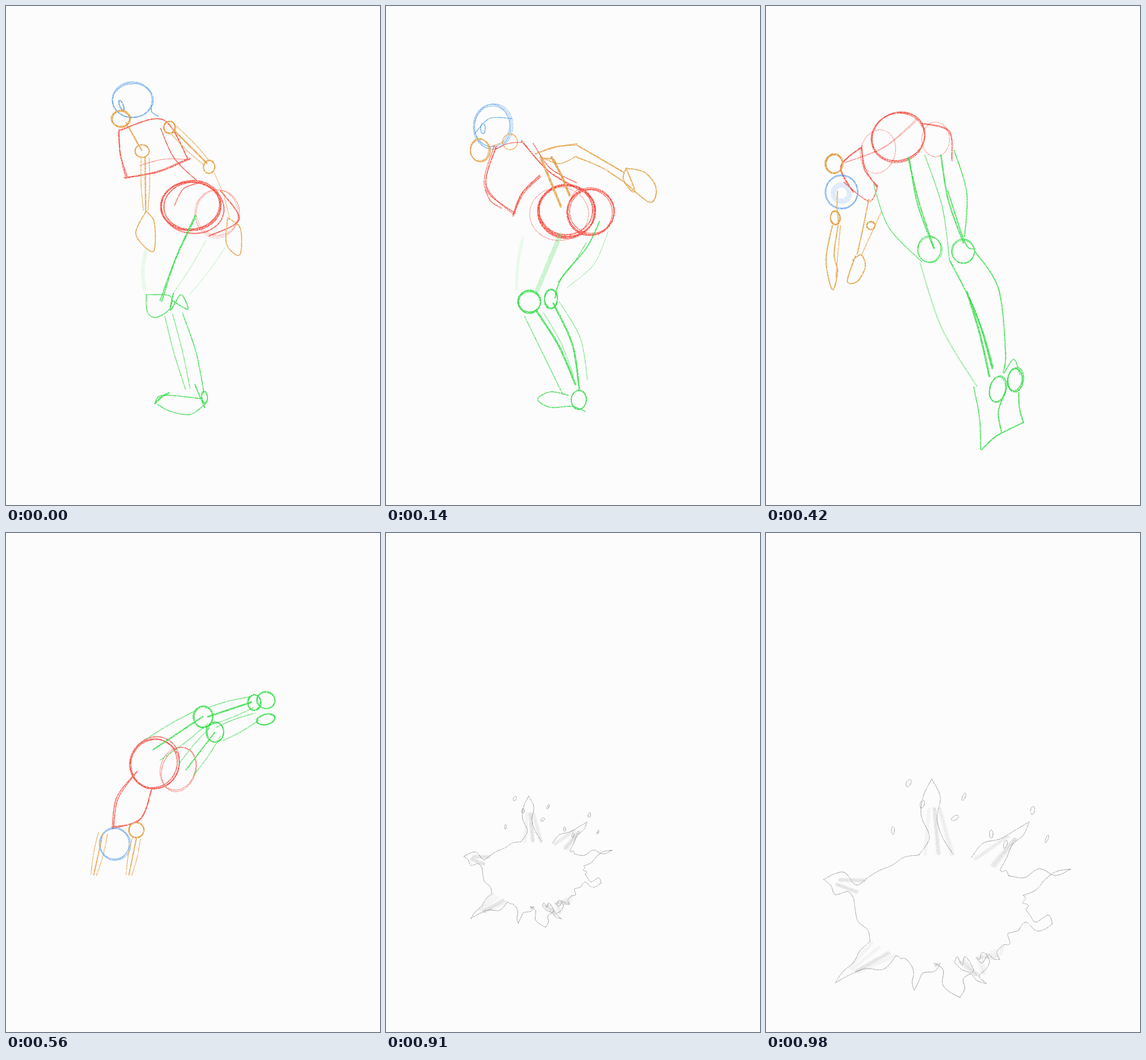
An HTML page for the animation above (1.05 s loop, 648 by 864 pixels).

```html
<!DOCTYPE html>
<html lang="en">
<head>
<meta charset="utf-8">
<title>Dive study</title>
<style>
  html, body { margin: 0; width: 100%; height: 100%; overflow: hidden; background: #fcfcfc; }
  svg { display: block; width: 100vw; height: 100vh; }
  path, ellipse { fill: none; stroke-linecap: round; stroke-linejoin: round; vector-effect: non-scaling-stroke; }
</style>
</head>
<body>
<svg id="stage" viewBox="0 0 648 864">
  <filter id="grain" filterUnits="userSpaceOnUse" x="0" y="0" width="648" height="864" color-interpolation-filters="sRGB">
    <feTurbulence type="fractalNoise" baseFrequency=".6" numOctaves="2" seed="4"/>
    <feColorMatrix values="0 0 0 0 0  0 0 0 0 0  0 0 0 0 0  3 0 0 0 -.6" result="tooth"/>
    <feComposite in="SourceGraphic" in2="tooth" operator="in"/>
  </filter>
</svg>
<script>
const stage = document.getElementById('stage');
const LOOP = 1050;
let layer, seed = 7;

const random = () => (seed = seed * 16807 % 2147483647) / 2147483647;
const jitter = amount => (random() * 2 - 1) * amount;

function add(parent, tag, attrs) {
  const node = document.createElementNS('http://www.w3.org/2000/svg', tag);
  for (const key in attrs) node.setAttribute(key, attrs[key]);
  return parent.appendChild(node);
}

// Smooth curve through a list of points.
function curve(p) {
  const at = i => p[Math.max(0, Math.min(p.length - 1, i))];
  const handle = (a, b, c, k) => [0, 1].map(j => b[j] + (c[j] - a[j]) * k / 6);
  return 'M' + p[0] + p.slice(1).map((to, i) =>
    `C${handle(at(i - 1), at(i), to, 1)} ${handle(at(i), to, at(i + 2), -1)} ${to}`).join('');
}

// The point beside a straight segment: t along it, side to its left.
function beside(x1, y1, x2, y2, t, side) {
  const dx = x2 - x1, dy = y2 - y1, length = Math.hypot(dx, dy) || 1;
  return [x1 + dx * t + dy / length * side, y1 + dy * t - dx / length * side];
}

function pen(stroke, weight = 1.3) {
  const ink = (width, opacity) => ({ stroke, 'stroke-width': width * weight, 'stroke-opacity': opacity });
  const trace = (points, width = 1.3, opacity = .85, passes = 1) => {
    for (let i = 0; i < passes; i++) {
      const loose = i ? 3 : 0;
      add(layer, 'path', { d: curve(points.map(([x, y]) => [x + jitter(loose), y + jitter(loose)])), ...ink(width, opacity) });
    }
  };
  const line = (text, ...style) => trace(text.split(' ').map(pair => pair.split(',').map(Number)), ...style);
  const bow = (x1, y1, x2, y2, bend, ...style) =>
    trace([[x1, y1], beside(x1, y1, x2, y2, .5, bend), [x2, y2]], ...style);
  // Two outlines around a straight bone, with an optional core stroke.
  const limb = (x1, y1, x2, y2, start, end, core = 0, width = 1.1) => {
    const bone = [x1, y1, x2, y2];
    for (const side of [-1, 1])
      bow(...beside(...bone, 0, side * start), ...beside(...bone, 1, side * end), side * 2, width, .7);
    if (core) bow(...bone, 0, core);
  };
  const ring = (cx, cy, rx, ry, count = 1, width = 1.3, tilt = 0, opacity = .8) => {
    for (let i = 0; i < count; i++) {
      const loose = i ? .07 : 0, x = cx + jitter(rx * loose), y = cy + jitter(ry * loose);
      add(layer, 'ellipse', {
        cx: x, cy: y, rx: rx * (1 + jitter(loose)), ry: ry * (1 + jitter(loose)),
        transform: `rotate(${tilt + jitter(loose * 150)} ${x} ${y})`, ...ink(width, opacity)
      });
    }
  };
  const ragged = (x1, y1, x2, y2, steps, rough, ...style) =>
    trace(Array.from({ length: steps + 1 }, (_, i) =>
      beside(x1, y1, x2, y2, i / steps, i % steps ? jitter(rough) : 0)), ...style);
  return { line, bow, limb, ring, ragged };
}

const blue = pen('#4793e6'), red = pen('#f53d30'), orange = pen('#e0932b');
const green = pen('#25d93b'), grey = pen('#555', 1);

function crouch() {
  blue.ring(219, 163, 34, 30, 3, 1.1, 0, .6);
  blue.bow(252, 170, 264, 191, -6);
  blue.ring(200, 172, 3, 9, 2, 1.2, -20);
  red.bow(196, 215, 208, 298, -4, 1.4, .8, 2);
  red.bow(207, 298, 318, 264, -6, 1.2, .7, 3);
  red.bow(196, 215, 314, 262, 45, 1.4, .7, 2);
  red.bow(268, 212, 330, 302, -10, 1.3);
  red.bow(232, 276, 318, 266, 6, 1, .6);
  red.ring(320, 347, 52, 42, 4, 1.6);
  red.ring(365, 360, 37, 42, 3, .8, 0, .4);
  red.bow(372, 320, 352, 398, 43, 1.7);
  red.bow(292, 345, 340, 305, 12);
  orange.ring(199, 196, 15, 14, 3, 1.4);
  orange.bow(208, 202, 235, 250, 0, 1.8);
  orange.ring(236, 251, 12, 11, 2);
  orange.limb(241, 263, 242, 354, 7, 4, 1.8);
  orange.line('243,355 225,395 255,425 257,375 243,355', 1.4);
  orange.ring(283, 210, 10, 10, 3, 1.5);
  orange.limb(290, 214, 348, 272, 8, 6, 2);
  orange.ring(352, 279, 10, 11, 2);
  orange.bow(361, 289, 388, 370, 3, 1, .6);
  orange.line('384,367 406,385 405,431 382,412 384,367', 1.4);
  green.bow(328, 362, 267, 510, -3, 1.6, .8, 2);
  green.bow(347, 405, 288, 500, 2, .8, .4);
  green.bow(380, 418, 318, 500, 2, .8, .3);
  green.bow(242, 425, 240, 490, -4, 5, .1);
  green.line('243,500 245,530 260,539 283,525 284,502 243,500');
  green.line('290,498 285,527 303,500 315,525 288,510', 1.7);
  green.limb(282, 536, 315, 663, 7, 4);
  green.bow(306, 532, 343, 670, 5);
  green.line('258,688 272,674 340,680');
  green.line('263,690 285,702 320,707 346,688');
  green.bow(258, 688, 282, 670, 2, 2.4);
  green.bow(327, 655, 344, 695, 0, 1.7);
  green.ring(344, 677, 5, 10, 2);
}

function windUp() {
  blue.ring(185, 207, 32, 37, 4, .9, 0, .6);
  blue.bow(153, 222, 218, 195, 15, 1);
  blue.ring(168, 212, 4, 9);
  orange.ring(163, 250, 17, 19, 3, 1.1);
  orange.ring(215, 235, 13, 14, 2, 1, 0, .6);
  orange.bow(178, 245, 205, 235, 0, 1);
  red.bow(190, 244, 222, 362, -33, 1.2, .7, 3);
  red.bow(172, 318, 200, 350, -6);
  red.bow(220, 362, 265, 294, 8, 1.2, .7, 4);
  red.bow(190, 248, 235, 236, 4, 1);
  red.bow(235, 233, 340, 320, -11, 1.4, .75, 2);
  red.bow(255, 238, 330, 306, -12, 1.2);
  red.ring(314, 355, 49, 44, 4, 1.7);
  red.ring(300, 360, 51, 46, 1, .9, 0, .5);
  red.ring(355, 357, 40, 40, 4, 1.2);
  red.ring(338, 355, 22, 38, 1, 1, 0, .5);
  orange.bow(268, 262, 303, 347, 0, 3);
  orange.bow(287, 262, 318, 328, 2, 3);
  orange.bow(274, 264, 297, 280, 8, 2);
  orange.bow(258, 256, 330, 241, 5, 1.2, .8, 2);
  orange.bow(270, 262, 330, 260, -12);
  orange.bow(331, 241, 412, 288, 0, 1.8);
  orange.bow(331, 262, 410, 303, 4, 1.5);
  orange.line('416,281 411,300 426,321 430,316 416,281', 1.5);
  orange.line('416,281 448,288 468,315 457,340 412,304', 1.6);
  green.bow(302, 396, 262, 492, 0, 6, .28);
  green.bow(237, 402, 226, 490, -3, 4, .1);
  green.line('370,373 348,418 304,471 293,505', 1.7);
  green.bow(347, 410, 298, 478, 3, 1);
  green.bow(385, 390, 313, 488, 14, .8, .5);
  green.ring(248, 512, 20, 19, 4);
  green.ring(286, 507, 11, 17, 3);
  green.bow(240, 537, 306, 672, 0, 1);
  green.bow(260, 527, 328, 655, 6, 2.7);
  green.bow(272, 530, 325, 640, 5, 1, .6);
  green.bow(290, 515, 335, 664, 11, 2.4);
  green.bow(300, 512, 349, 647, 13, .9, .7);
  green.line('316,674 285,668 263,681 285,695 322,693 345,702');
  green.ring(334, 682, 13, 16, 2);
}

function bend() {
  blue.ring(187, 252, 33, 33, 3, 1, 0, .6);
  blue.bow(164, 252, 166, 278, 3);
  orange.ring(151, 317, 22, 19, 3, 1.2);
  orange.limb(153, 335, 155, 412, 16, 14);
  orange.bow(150, 335, 155, 410, 0, 6, .13);
  orange.bow(154, 375, 157, 425, 0, 1.6);
  orange.ring(157, 424, 13, 13, 3);
  orange.limb(150, 436, 136, 528, 5, 5, 0, 1.5);
  orange.bow(174, 420, 151, 525, 0, .9, .6);
  orange.line('131,530 118,570 115,598 128,601 141,598 150,558', 1.5);
  orange.line('160,535 165,575 156,580 152,562', 1.5);
  orange.ring(151, 542, 10, 12, 1, 1.5);
  orange.bow(120, 568, 148, 576, 0, .9);
  orange.bow(114, 598, 140, 598, -4, 2);
  red.line('247,281 195,273 158,300 168,340 200,385 242,398', 1.4, .8, 2);
  red.bow(182, 360, 238, 399, -16, 1.1);
  red.bow(254, 289, 297, 315, -4, 1.7, .8, 2);
  red.bow(235, 394, 298, 315, 14, 1.4, .75, 5);
  red.ring(322, 367, 58, 50, 3, 1.3, 10);
  red.ring(337, 369, 44, 43, 1, 1, 0, .6);
  red.bow(275, 318, 372, 340, 10, 1.6);
  red.bow(358, 326, 402, 412, 37, 1.3, .75, 2);
  red.bow(405, 408, 362, 408, 5, 1.3, .75, 2);
  orange.ring(248, 284, 9, 7, 3);
  green.line('323,410 268,480 247,510 247,528', 1.8);
  green.bow(318, 415, 262, 503, 3, 1, .6, 2);
  green.bow(249, 408, 222, 530, -17, 1);
  green.bow(395, 417, 308, 510, 4, 2.9);
  green.bow(358, 418, 295, 505, 7, 1);
  green.bow(413, 400, 330, 490, 14, .9, .6);
  green.ring(245, 524, 23, 17, 4, 1.6);
  green.ring(292, 520, 17, 14, 3, 1.5);
  green.line('225,540 245,575 320,620 352,652', 1.1);
  green.bow(255, 540, 372, 642, 7, 1.7);
  green.bow(300, 535, 388, 632, 3, 1.7);
  green.bow(312, 525, 398, 632, 7, 1.2);
  green.line('352,652 317,690 338,709 385,685', 1);
  green.bow(330, 672, 410, 655, 14, 1.3, .8, 2);
  green.bow(328, 670, 350, 655, 0, 2.3);
  green.ring(379, 669, 14, 15, 2, 1);
  green.ring(402, 655, 10, 13, 3, 1.5);
}

function leap() {
  red.ring(229, 226, 47, 41, 3, 1.2, -20);
  red.ring(194, 252, 30, 38, 1, .9, 15, .5);
  red.bow(135, 272, 262, 195, -12, .9, .5, 2);
  red.bow(270, 203, 322, 265, 28, 1.2, .75, 2);
  red.ring(294, 231, 24, 30, 1, .9, 0, .5);
  red.bow(165, 245, 150, 320, -28, 1.4, .8, 2);
  red.bow(165, 245, 193, 315, -7, 1.4, .8, 2);
  red.line('193,315 178,338 135,305');
  blue.ring(131, 322, 27, 29, 3, 1, 0, .6);
  blue.ring(131, 324, 14, 14, 2, 7, 0, .1);
  orange.ring(118, 273, 15, 16, 4, 1.5);
  orange.bow(124, 320, 126, 378, -2);
  orange.ring(120, 367, 8, 12, 3);
  orange.line('115,380 104,440 115,491 124,460 118,430 125,380', 1.6);
  orange.bow(129, 380, 121, 470, 0, 1);
  orange.line('178,335 168,385 158,430', 1.5);
  orange.bow(200, 356, 166, 430, 0, 1);
  orange.line('155,433 141,476 158,477 172,452 165,431 150,440', 1.6);
  orange.ring(182, 380, 7, 7, 2, 1.6);
  green.bow(185, 303, 270, 443, -18, 1);
  green.bow(275, 258, 318, 440, 9, 1);
  green.bow(248, 262, 290, 418, -7, 1.8, .8, 2);
  green.bow(303, 258, 342, 410, -7, 2);
  green.line('315,320 345,410 362,420', 1.5);
  green.bow(326, 250, 344, 400, 13, 1.4);
  green.ring(283, 421, 20, 23, 3, 1, 0, .7);
  green.ring(342, 425, 19, 21, 3, 1.1, 0, .7);
  green.bow(267, 445, 365, 658, -13, 1.8, .4);
  green.bow(318, 440, 392, 628, 9, 1.7);
  green.bow(348, 495, 387, 641, 3, 2.6);
  green.bow(352, 505, 393, 625, 3, 2.2);
  green.line('362,425 403,490 415,600 411,635', 1.5);
  green.ring(402, 663, 14, 23, 2, 1.5, 15);
  green.ring(432, 648, 13, 20, 3, 1.5);
  green.bow(413, 635, 440, 638, 25);
  green.bow(360, 660, 372, 768, 4, 1.4);
  green.bow(415, 668, 408, 738, -9, 1.7);
  green.bow(438, 670, 446, 721, -3, 1.7);
  green.line('446,721 400,744 374,768', 1.7);
}

function plunge() {
  red.ring(258, 398, 42, 46, 3, 1.3, 25);
  red.ring(298, 408, 30, 38, 2, 1, 20, .6);
  red.bow(225, 415, 184, 512, -14, 1.4, .8, 2);
  red.bow(252, 445, 184, 512, 22, 1.4, .8, 2);
  blue.ring(188, 538, 26, 28, 3, 1, 0, .6);
  orange.ring(226, 514, 13, 13, 3);
  orange.limb(168, 520, 152, 592, 8, 5, 1.5);
  orange.limb(226, 528, 213, 592, 7, 5, 1.5);
  green.limb(255, 375, 341, 318, 22, 15, 2);
  green.limb(312, 410, 362, 345, 16, 12, 1.6);
  green.ring(341, 318, 17, 18, 3);
  green.ring(362, 345, 15, 17, 3);
  green.limb(350, 318, 425, 293, 15, 10, 2.4);
  green.limb(370, 348, 435, 318, 13, 7);
  green.ring(430, 293, 11, 13, 3);
  green.ring(450, 290, 16, 14, 2, 1.4, 10);
  green.ring(450, 323, 16, 9, 2, 1.4, -10);
}

function enter() {
  green.line('290,415 253,450 247,475 253,493', 1.8);
  green.bow(300, 415, 273, 500, 0, 1.8, .8, 2);
  green.bow(306, 425, 290, 512, -11);
  green.bow(320, 425, 292, 504, -8, 1.2);
  green.bow(345, 430, 318, 513, 7, 1.6);
  green.bow(340, 425, 320, 490, 4, 1);
  green.ring(266, 506, 9, 11, 3, 1.8, 30);
  green.ring(309, 503, 12, 10, 3);
  green.line('218,517 245,523 280,514 320,513', 1.8);
  green.line('290,410 292,383 310,376 325,395 365,408', 1.6);
  green.line('303,390 305,402 358,406', 1.6);
  green.bow(291, 408, 372, 410, -16, 1.8);
  green.bow(305, 409, 358, 412, -4, 9, .25);
  green.bow(318, 380, 390, 410, 3, 1.8);
  green.bow(325, 390, 354, 383, 14, 3.2);
  green.ring(376, 421, 11, 11, 2, 1.8);
  green.line('360,430 380,441 397,430 390,424 398,418 388,410', 3);
  red.ring(229, 484, 13, 28, 2, 1.3, 28);
  red.bow(243, 468, 222, 505, -4);
  red.line('222,528 208,558 245,585 260,575 265,525', 1.6);
  red.line('296,520 290,560 285,582 258,580', 1.6);
  red.bow(218, 522, 298, 516, -6);
  red.bow(222, 575, 258, 582, -10);
  red.ring(263, 547, 2, 2, 1, 3);
  for (const [x, y] of [[202, 545], [198, 582], [304, 552], [302, 572], [298, 588], [260, 591]])
    grey.ragged(x - 10, y + 3, x + 10, y - 3, 6, y > 585 ? 5 : 12, .9, .65);
  grey.ring(372, 567, 26, 8, 2, 1.5, -8, .2);
}

// Water tongues reach from an elliptical rim to their tips; the rim and sides are ragged.
function splash() {
  seed = 21;
  const rim = angle => [300 + 150 * Math.cos(angle), 650 + 95 * Math.sin(angle)];
  const tips = [[287, 426], [456, 500], [528, 582], [496, 677], [405, 738], [382, 780],
    [336, 804], [257, 792], [120, 779], [100, 600]];
  const roots = tips.map(([x, y]) => Math.atan2((y - 650) / 95, (x - 300) / 150));
  tips.forEach((tip, i) => {
    const next = roots[(i + 1) % roots.length];
    const start = rim(roots[i] - .2), end = rim(roots[i] + .2);
    grey.ragged(...start, ...tip, 4, 13, .9, .65);
    grey.ragged(...tip, ...end, 4, 13, .9, .65);
    if (i) grey.ragged(...end, ...rim(next - .2), 4, 9, .9, .6);
    if (i % 4 < 2) for (let k = 0; k < 6; k++) {
      const [x, y] = rim(roots[i] + jitter(.2));
      grey.bow(x, y, x + (tip[0] - x) * .6, y + (tip[1] - y) * .6, 0, 6, .06);
    }
  });
  for (let i = 0; i < 9; i++)
    grey.ring(210 + i * 36 + jitter(12), 470 + i * 9 + jitter(60), 2 + random() * 2, 7, 1, .9, 30 + jitter(30), .6);
}

const poses = [
  [0, crouch], [140, windUp], [280, bend], [420, leap],
  [560, plunge], [700, enter], [910, splash, 'translate(75 200) scale(.6)'], [980, splash]
].map(([start, draw, transform = '']) => {
  const group = add(stage, 'g', { filter: 'url(#grain)', display: 'none' });
  layer = add(group, 'g', { transform });
  draw();
  return { start, group };
});

let shown;
function render(now) {
  const time = now % LOOP;
  const pose = poses.filter(p => p.start <= time).pop();
  if (pose === shown) return;
  shown?.group.setAttribute('display', 'none');
  pose.group.setAttribute('display', 'inline');
  shown = pose;
}

const origin = performance.now();
function tick() {
  render(performance.now() - origin);
  requestAnimationFrame(tick);
}
tick();
</script>
</body>
</html>
```
